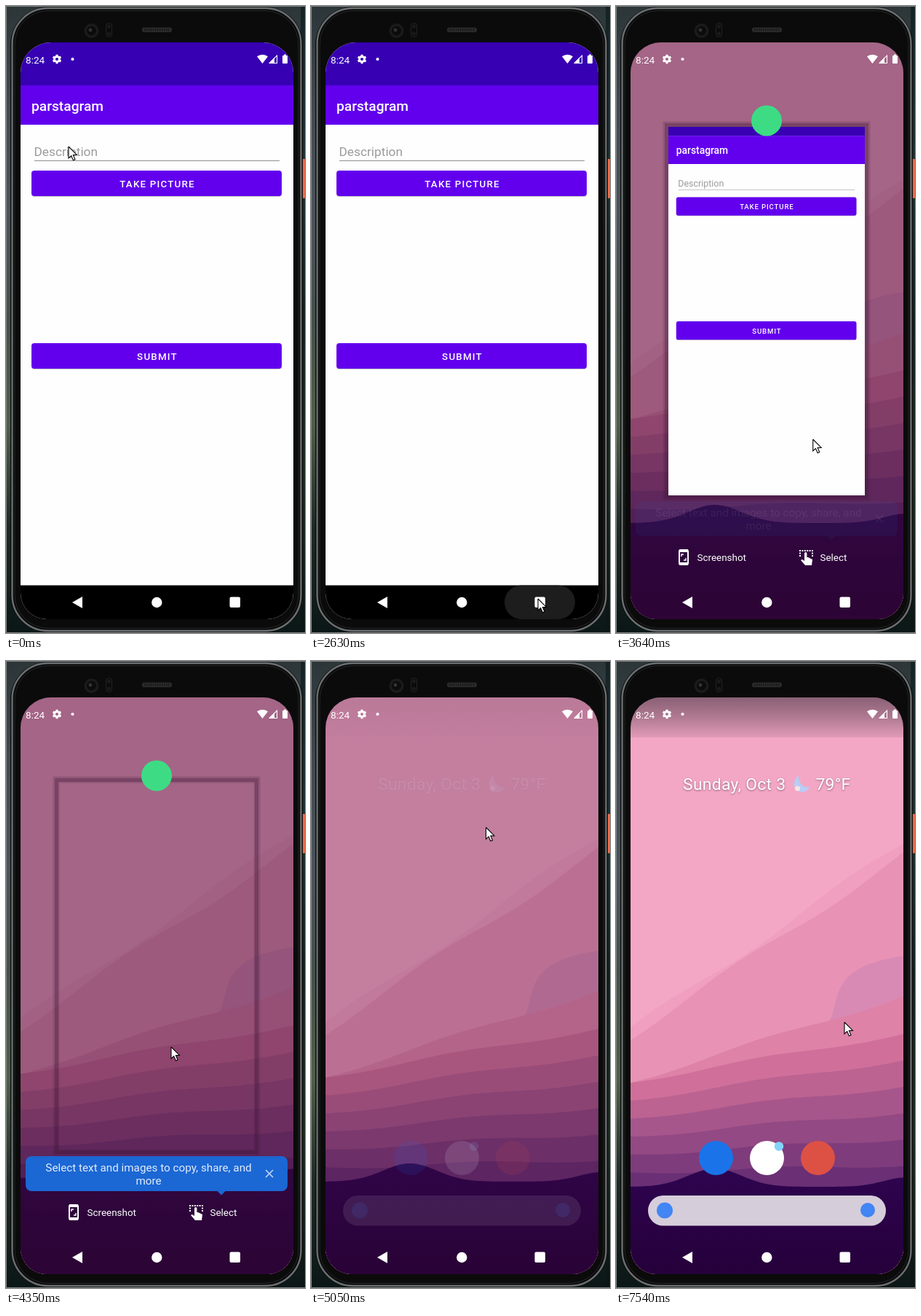
Write an HTML page with a canvas that moves like this. It is 411 px wide and 861 px high and loops after 8000 ms.

```html
<!DOCTYPE html>
<html lang="en">
<head>
<meta charset="utf-8">
<title>Phone recents</title>
<style>
html, body { margin: 0; width: 100%; height: 100%; overflow: hidden; background: #050505; }
canvas { display: block; width: 411px; height: 861px; }
</style>
</head>
<body>
<canvas id="stage" width="411" height="861"></canvas>
<script>
const g = document.getElementById('stage').getContext('2d');
const LOOP = 8000, STEP = 145;
const L = 20, T = 50, R = 395, B = 842, W = R - L, H = B - T;

// Pointer stops: time, x, y.
const path = [
  [0, 86, 193], [1060, 280, 774], [1640, 211, 760], [2360, 311, 814],
  [2610, 312, 814], [3190, 297, 634], [4350, 227, 530], [4640, 241, 130],
  [4785, 242, 112], [5365, 239, 345], [6090, 211, 568], [6380, 255, 481],
  [6960, 290, 843], [7105, 334, 715], [7540, 314, 496]
];

const lerp = (a, b, k) => a + (b - a) * k;
const ramp = (t, a, b) => Math.max(0, Math.min(1, (t - a) / (b - a)));
const bell = d => Math.exp(-d * d);

function pointer(t) {
  const i = path.findIndex(p => p[0] > t);
  if (i < 0) return path[path.length - 1].slice(1);
  const a = path[i - 1], b = path[i], k = ramp(t, a[0], b[0]);
  return [lerp(a[1], b[1], k), lerp(a[2], b[2], k)];
}

function box(x, y, w, h, r, fill) {
  g.fillStyle = fill;
  g.beginPath();
  g.roundRect(x, y, w, h, r);
  g.fill();
}

function ring(x, y, w, h, r, color, width) {
  g.strokeStyle = color;
  g.lineWidth = width;
  g.beginPath();
  g.roundRect(x, y, w, h, r);
  g.stroke();
}

function disc(x, y, r, fill) {
  box(x - r, y - r, 2 * r, 2 * r, r, fill);
}

function trace(points) {
  g.beginPath();
  for (let i = 0; i < points.length; i += 2) g.lineTo(points[i], points[i + 1]);
}

function poly(points, fill) {
  trace(points);
  g.fillStyle = fill;
  g.fill();
}

function line(points, color, width) {
  trace(points);
  g.strokeStyle = color;
  g.lineWidth = width;
  g.stroke();
}

function text(str, x, y, size, color, opt = {}) {
  g.font = `${opt.weight || 400} ${size}px Roboto, sans-serif`;
  g.letterSpacing = (opt.space || 0) + 'px';
  g.textAlign = opt.align || 'left';
  g.fillStyle = color;
  g.fillText(str, x, y);
}

function fade(y0, y1, ...colors) {
  const f = g.createLinearGradient(0, y0, 0, y1);
  colors.forEach((c, i) => f.addColorStop(i / (colors.length - 1), c));
  return f;
}

// Fills everything below the curve y(x).
function land(y, fill) {
  const points = [];
  for (let x = L; x <= R; x += 3) points.push(x, y(x));
  poly([...points, R, B + 20, L, B + 20], fill);
}

function slope(left, right, wave, fill) {
  land(x => lerp(left, right, (x - L) / W) + wave * Math.sin(x / 42 + left), fill);
}

function wallpaper(dim) {
  box(L, T, W, H, 0, '#f4a7c5');
  g.save();
  g.translate(0, -12 * dim);
  slope(506, 250, 5, '#f09fc1');
  slope(516, 266, 5, '#e893b5');
  g.fillStyle = '#d98ab4';
  g.beginPath();
  g.moveTo(290, 500);
  g.bezierCurveTo(312, 470, 285, 420, R, 405);
  g.lineTo(R, 500);
  g.fill();
  slope(578, 460, 3, '#de82a8');
  for (let i = 0; i < 6; i++) {
    const k = i / 5;
    const color = `rgb(${lerp(208, 106, k)},${lerp(112, 47, k)},${lerp(154, 116, k)})`;
    slope(578 + 25 * i, 512 + 36 * i, 2.5, color);
  }
  land(x => 722 - 25 * bell((x - 136) / 52) - 13 * bell((x - 400) / 45), fade(700, 842, '#2e0450', '#2a0245', '#25003a'));
  g.restore();
  box(L, T, W, H, 0, `rgba(54,10,46,${0.42 * dim})`);
}

function button(label, y) {
  box(35, y + 1, 344, 35, 4, 'rgba(0,0,0,.22)');
  box(35, y, 344, 35, 4, '#6200ee');
  text(label, 208, y + 23, 13.36, '#fff', { weight: 500, space: 1.19, align: 'center' });
}

function app() {
  box(L, T, W, H, 0, '#fefefe');
  box(L, T, W, 59.5, 0, '#3700b3');
  box(L, 109, W, 54, 0, '#6200ee');
  text('parstagram', 35, 143.5, 19.2, '#fff', { weight: 500 });
  text('Description', 38.5, 206, 17.3, '#9b9b9b');
  box(39, 212, 337, 1, 0, '#8f8f8f');
  button('TAKE PICTURE', 226);
  button('SUBMIT', 463);
  box(L, 795.5, W, B - 795.5, 0, '#000');
}

function statusBar() {
  text('8:24', 27, 78.5, 13.6, '#fff');
  ring(66.5, 69.5, 7, 7, 3.5, '#fff', 2.8);
  for (let i = 0; i < 6; i++) {
    const a = (i + 0.5) * Math.PI / 3, c = Math.cos(a), s = Math.sin(a);
    line([70 + c * 4.3, 73 + s * 4.3, 70 + c * 6.2, 73 + s * 6.2], '#fff', 3);
  }
  disc(91.5, 73, 2.1, '#fff');
  g.fillStyle = '#fff';
  g.beginPath();
  g.moveTo(352.5, 79);
  g.arc(352.5, 79, 12.3, -Math.PI / 2 - 0.66, -Math.PI / 2 + 0.66);
  g.fill();
  poly([361, 79, 369, 79, 369, 71], '#fff');
  line([362, 78.5, 372.5, 68, 372.5, 78.5, 362, 78.5], '#fff', 1.1);
  box(380, 68, 7, 11, 1, '#fff');
  box(382, 66.5, 3, 2, 0, '#fff');
}

function navBar() {
  poly([91, 819, 105, 811, 105, 827], '#fff');
  disc(207.3, 819, 7.2, '#fff');
  box(307.5, 811.5, 14.5, 14.5, 2, '#fff');
}

function ripple(t) {
  if (t < 2465) return;
  const k = lerp(0.6, 1, ramp(t, 2465, 2610));
  g.globalAlpha = 1 - ramp(t, 2770, 3100);
  box(314.5 - 48.5 * k, 795.5, 97 * k, 46.5, 23, '#1d1d1d');
  g.globalAlpha = 1;
}

// Draws the app clipped to a window, scaled so that (ax, ay) lands on (x, y).
function appWindow(x, y, w, h, scale, ax, ay) {
  g.save();
  g.beginPath();
  g.rect(x, y, w, h);
  g.clip();
  g.translate(x, y);
  g.scale(scale, scale);
  g.translate(-ax, -ay);
  app();
  g.restore();
}

function card(t) {
  g.save();
  g.translate(0, -750 * ramp(t, 4350, 4640));
  ring(69, 163, 276, 512, 0, 'rgba(60,22,55,.18)', 9);
  ring(69.5, 163.5, 275, 511, 0, 'rgba(60,22,55,.3)', 5);
  if (t < 4300) appWindow(72, 166, 270, 506, 0.72, L, 92);
  disc(207, 157.5, 21, '#3ddc84');
  g.restore();
}

function actions() {
  ring(87, 747, 12, 20, 2, '#fff', 2);
  for (const y of [746, 764]) box(87, y, 12, 4, 1, '#fff');
  line([90, 756, 90, 753, 93, 753], '#fff', 1.4);
  line([96, 758, 96, 761, 93, 761], '#fff', 1.4);
  text('Screenshot', 111.5, 762, 13.45, '#fff');

  for (let x = 252; x < 271; x += 3.4) box(x, 747, 2, 2, 0, '#fff');
  for (const x of [252, 269]) for (const y of [750.5, 754]) box(x, y, 2, 2, 0, '#fff');
  box(259, 750, 3.4, 13, 1.7, '#fff');
  poly([259, 757, 264, 757, 270, 760, 269, 768, 260, 768, 254, 761, 256, 760, 259, 762], '#fff');
  text('Select', 280.5, 762, 13.45, '#fff');
}

function bubble(t) {
  g.globalAlpha = ramp(t, 3600, 3920);
  box(27, 680, 360, 48, 8, '#1b67d4');
  poly([290, 727.5, 302, 727.5, 296, 733.5], '#1b67d4');
  const mid = { align: 'center' };
  text('Select text and images to copy, share, and', 196, 701, 15.25, '#e3ecfb', mid);
  text('more', 196, 719, 15.25, '#e3ecfb', mid);
  line([357, 699, 367, 709], '#bcd3f4', 1.7);
  line([367, 699, 357, 709], '#bcd3f4', 1.7);
  g.globalAlpha = 1;
}

function home(alpha) {
  g.globalAlpha = alpha;
  box(L, T, W, 55, 0, fade(T, 105, 'rgba(60,45,60,.58)', 'rgba(60,45,60,.37)', 'rgba(60,45,60,.1)'));
  g.shadowColor = 'rgba(70,40,70,.6)';
  g.shadowBlur = 3;
  g.shadowOffsetY = 1;
  text('Sunday, Oct 3', 92, 177, 22.9, '#fff', { space: 0.3 });
  text('79°F', 274.5, 177, 22.9, '#fff', { space: 0.2 });
  g.shadowColor = 'transparent';
  g.fillStyle = '#b9ccf5';
  g.beginPath();
  g.moveTo(251, 157);
  g.bezierCurveTo(240, 166, 245, 180, 256, 180);
  g.quadraticCurveTo(263, 180, 266, 173);
  g.bezierCurveTo(257, 175, 250, 167, 251, 157);
  g.fill();
  disc(249.5, 175, 3.6, '#f3e6e6');

  ['#1a73e8', '#fff', '#dd5144'].forEach((c, i) => disc(137.5 + 70 * i, 682.5, 23.5, c));
  disc(224, 666.5, 6.2, '#83d3fb');
  box(44, 734, 327, 41.5, 20.7, '#d6cddb');
  disc(67, 754.5, 11, '#4285f4');
  disc(346, 754, 10, '#4285f4');
  g.globalAlpha = 1;
}

function phone() {
  box(0, 0, 411, 861, 0, fade(0, 861, '#2c3638', '#414a51', '#4b535b', '#44504a', '#4d6047', '#1b2a25', '#0b1716'));
  box(405, 0, 6, 861, 0, fade(0, 861, '#142426', '#1b3335', '#10211f', '#1a2b22', '#0b1514'));
  box(407, 210, 4, 54, 1, '#ee6a45');
  ring(0.5, 0.5, 420, 860, 0, '#7b807f', 1);
  box(6, 1, 402, 859, 52, '#0b0b0b');
  ring(8.5, 3, 397, 855, 49, '#6c6f71', 2.4);
  ring(12, 6.5, 390, 848, 46, '#242627', 1);
  disc(117.5, 34, 10, '#1b1b1b');
  disc(117.5, 34, 6.5, '#0c0c0c');
  disc(116, 33, 2.4, '#333');
  ring(137.5, 23.5, 8, 19, 4, '#242424', 1);
  for (const y of [28, 38]) disc(141.5, y, 2.6, '#1a1a1a');
  box(187, 29.5, 41, 6.5, 3, '#2b2b2b');
  for (let x = 190; x < 226; x += 3) box(x, 31, 1.4, 3.5, 0, '#191919');
}

function cursor(x, y) {
  g.save();
  g.translate(x, y);
  const arrow = [0, 0, 0, 16, 3.7, 12.6, 6.4, 18.8, 9, 17.7, 6.4, 11.6, 11.4, 11.4, 0, 0];
  poly(arrow, '#fff');
  line(arrow, '#000', 1.1);
  g.restore();
}

function screen(t) {
  if (t < 3190) {
    app();
    ripple(t);
  } else if (t < 3300) {
    wallpaper(0);
    appWindow(24.5, 61, 365, 761, 0.974, L, 55.5);
  } else if (t < 4700) {
    wallpaper(1);
    card(t);
    actions();
    bubble(t);
  } else {
    wallpaper(1 - ramp(t, 4785, 5500));
    home(ramp(t, 5000, 5640));
  }
  statusBar();
  navBar();
}

function frame(now) {
  // The screen refreshes in even steps.
  const t = Math.floor(now % LOOP / STEP + 0.25) * STEP;
  phone();
  g.save();
  g.beginPath();
  g.roundRect(L, T, W, H, [42, 42, 36, 36]);
  g.clip();
  screen(t);
  g.restore();
  cursor(...pointer(t));
}

let start;
function tick(now) {
  start ??= now;
  frame(now - start);
  requestAnimationFrame(tick);
}
requestAnimationFrame(tick);
</script>
</body>
</html>
```
